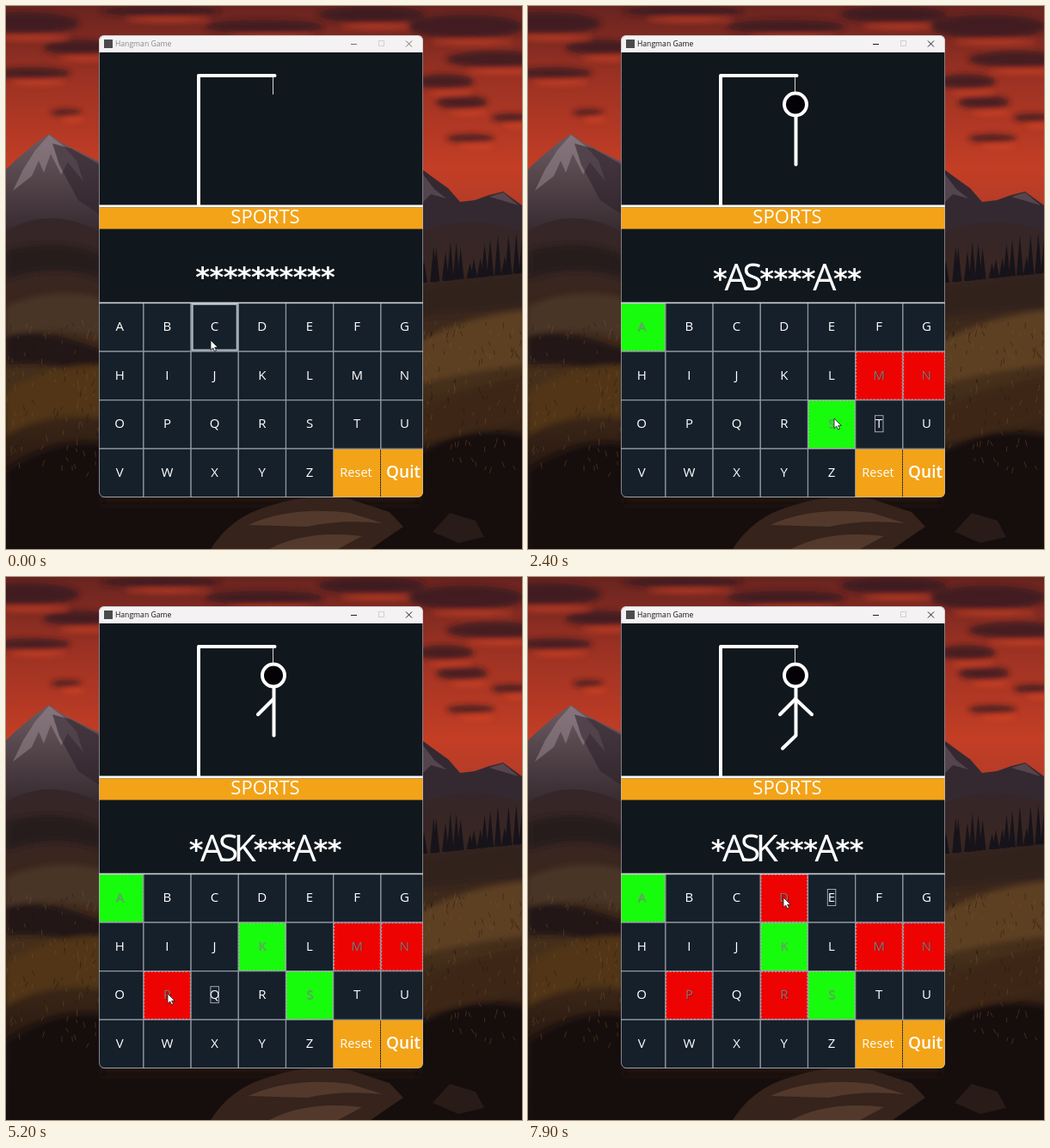
An HTML page for the animation above (8000 ms loop, 600 px wide and 632 px high).

```html
<!DOCTYPE html>
<html lang="en">
<head>
<meta charset="utf-8">
<title>Hangman Game</title>
<style>
html, body { margin: 0; width: 100%; height: 100%; overflow: hidden; background: #140e0d; }
svg { display: block; width: 600px; height: 632px; }
text { font-family: "Open Sans", "Noto Sans", sans-serif; font-stretch: 75%; fill: #fff; text-anchor: middle; }
#title { font-stretch: 100%; font-size: 8.6px; text-anchor: start; }
.star { font-family: "DejaVu Sans", sans-serif; font-stretch: 100%; font-size: 32px; }
.letter { font-size: 43px; }
.key { font-size: 15px; }
.man { fill: none; stroke: #fff; stroke-width: 4; stroke-linecap: round; }
</style>
</head>
<body>
<svg id="stage" viewBox="0 0 600 632">
  <defs>
    <linearGradient id="sky" x2="0" y2="1">
      <stop offset="0" stop-color="#682420"/>
      <stop offset=".3" stop-color="#9a3123"/>
      <stop offset=".7" stop-color="#c43e25"/>
      <stop offset="1" stop-color="#a63a2a"/>
    </linearGradient>
    <linearGradient id="land" x2="0" y2="1">
      <stop offset="0" stop-color="#35262a"/>
      <stop offset=".25" stop-color="#3a261d"/>
      <stop offset=".5" stop-color="#46301b"/>
      <stop offset=".72" stop-color="#2d1c13"/>
      <stop offset="1" stop-color="#140e0d"/>
    </linearGradient>
    <linearGradient id="rock" x2="0" y2="1">
      <stop offset="0" stop-color="#6d5b62"/>
      <stop offset="1" stop-color="#2e2328"/>
    </linearGradient>
    <filter id="soft" x="-30%" y="-60%" width="160%" height="220%"><feGaussianBlur stdDeviation="3"/></filter>
    <clipPath id="frame"><rect x="108" y="34" width="377" height="538" rx="6"/></clipPath>
  </defs>

  <rect width="600" height="270" fill="url(#sky)"/>
  <g id="clouds" filter="url(#soft)"></g>
  <path d="M0 190 L14 177 L34 160 L50 149 L66 160 L84 169 L108 181 V280 H0Z" fill="url(#rock)"/>
  <path d="M50 150 L34 168 L20 190 L8 215 L30 198 L38 180 L44 194 L52 172 L64 196 L72 182 L90 204 L82 180 L66 162Z" fill="#a5969b" opacity=".45"/>
  <path d="M54 160 L62 185 L84 226 L108 242 V184 L76 166Z" fill="#2c2028" opacity=".55"/>
  <path d="M485 191 L500 202 L514 212 L528 228 L545 226 L562 220 L578 216 L600 232 V300 H485Z" fill="#352931"/>
  <path d="M485 196 L498 213 L512 224 L494 219 L485 228Z" fill="#685760" opacity=".6"/>
  <path d="M562 222 L578 217 L596 232 L576 226Z" fill="#6f5960" opacity=".6"/>
  <path d="M0 262 Q50 232 108 262 V300 H485 V262 Q540 240 600 262 V632 H0Z" fill="url(#land)"/>
  <g filter="url(#soft)">
    <path d="M0 285 Q60 268 112 290 V318 Q60 298 0 318Z" fill="#251a1e"/>
    <path d="M0 350 Q50 326 112 340 V386 Q50 370 0 384Z" fill="#4a3427"/>
    <path d="M0 384 Q40 372 112 400 V432 Q50 412 0 418Z" fill="#231712"/>
    <path d="M0 450 Q50 415 112 418 V480 Q50 470 0 500Z" fill="#513419"/>
    <path d="M480 326 Q545 314 604 308 V350 L480 362Z" fill="#33231c"/>
    <path d="M480 390 Q540 360 604 354 V418 Q540 425 480 440Z" fill="#5d4020"/>
    <path d="M480 470 Q540 440 604 430 V480 L480 510Z" fill="#3d2816"/>
    <path d="M0 540 Q60 500 112 510 V580 H480 V520 Q540 485 604 500 V640 H0Z" fill="#17100f"/>
  </g>
  <g id="plants" fill="none"></g>
  <path d="M238 632 Q262 594 306 582 Q352 566 400 574 L446 589 L462 606 L424 632Z" fill="#35231c"/>
  <path d="M282 604 Q330 582 400 590 L438 602 Q390 597 350 606Z M306 632 Q350 609 414 617 L386 632Z" fill="#604332" opacity=".7"/>
  <path d="M496 612 L516 590 L546 599 L556 618 L526 625Z" fill="#291b17"/>

  <g clip-path="url(#frame)">
    <rect x="108" y="34" width="377" height="538" fill="#10171d"/>
    <rect x="108" y="34" width="377" height="20" fill="#f4f2f3"/>
    <rect x="114" y="39" width="10" height="10" fill="#4b4b4d"/>
    <text id="title" x="127" y="47">Hangman Game</text>
    <g id="controls" fill="none" stroke-width="1">
      <path d="M401 44.5h7M465 40.5l7 7m0-7l-7 7"/>
      <rect x="433.500" y="40.500" width="6" height="6" stroke="#d2d0d1"/>
    </g>
    <path class="man" d="M224 232V81H312.500" stroke-linejoin="round"/>
    <path d="M310.500 82V103" stroke="#d5d7d9"/>
    <g id="man">
      <circle class="man" cx="311" cy="114.500" r="13" style="fill:#050207"/>
      <path class="man" d="M311.500 129V184.500"/>
      <path class="man" d="M311 142L293 160"/>
      <path class="man" d="M311 142L330 160"/>
      <path class="man" d="M311 185L296 199.500"/>
    </g>
    <rect x="108" y="231.500" width="377" height="3" fill="#fff"/>
    <rect x="108" y="234.500" width="377" height="25" fill="#f3a318"/>
    <text x="301.500" y="252.500" font-size="22">SPORTS</text>
    <g id="word"></g>
    <g id="keys"></g>
    <rect x="381" y="516" width="54" height="56" fill="#f3a318"/>
    <rect x="436" y="516" width="50" height="56" fill="#f3a318"/>
    <path d="M435.500 516V572" stroke="#695334" stroke-dasharray="2 1"/>
    <text x="407" y="547.500" font-size="14.500">Reset</text>
    <text x="462" y="548.500" font-size="19" font-weight="600">Quit</text>
  </g>
  <rect x="108.500" y="34.500" width="376" height="537" rx="6" fill="none" stroke="#b9b9bd" stroke-opacity=".65"/>
  <path id="cursor" d="M0 0V11.500L2.700 9L4.600 13L6.500 12.100L4.700 8.300H8.300Z" fill="#fff" stroke="#161616" stroke-width=".8"/>
</svg>
<script>
const LOOP = 8000, STEP = 100, ANSWER = "BASKETBALL";
const SVG = "http://www.w3.org/2000/svg";
const get = id => document.getElementById(id);

function add(parent, tag, attrs, content = "") {
  const node = document.createElementNS(SVG, tag);
  for (const name in attrs) node.setAttribute(name, attrs[name]);
  node.textContent = content;
  return parent.appendChild(node);
}

let seed = 17;
const random = () => (seed = seed * 16807 % 2147483647) / 2147483647;

function paintScenery() {
  const clouds = [
    [20, 20, 65, 13], [85, 48, 42, 9], [30, 78, 45, 7], [70, 124, 18, 4],
    [180, 6, 70, 6], [300, 24, 70, 8], [425, 10, 62, 10], [535, 24, 68, 14],
    [570, 62, 58, 10], [510, 88, 34, 9], [530, 112, 30, 8], [540, 154, 28, 5], [588, 130, 24, 5]
  ];
  for (const [cx, cy, rx, ry] of clouds) {
    add(get("clouds"), "ellipse", { cx, cy, rx, ry, fill: "#351d20", opacity: .8 });
    add(get("clouds"), "ellipse", { cx: cx + 8, cy: cy + ry + 4, rx: rx * .7, ry: 3, fill: "#df4829", opacity: .6 });
  }
  for (let i = 0; i < 17; i++) {
    const x = 486 + i * 7 + random() * 5, h = 18 + random() * 30, y = 322 - i * .7;
    add(get("plants"), "path", { d: `M${x - 4} ${y}L${x} ${y - h}L${x + 4} ${y}Z`, fill: "#17131a" });
  }
  for (let i = 0; i < 260; i++) {
    const x = i % 2 ? 485 + random() * 115 : random() * 108, y = 370 + random() * 180;
    add(get("plants"), "path", {
      d: `M${x} ${y}l${random() * 6 - 3} ${-3 - random() * 5}`,
      stroke: random() < .5 ? "#7a5529" : "#1d130f", opacity: .45
    });
  }
}

// Press time of each guessed letter; releasing it reveals the outcome.
const guesses = [["A", 500], ["M", 1000], ["N", 1500], ["S", 2100], ["K", 3400], ["P", 5000], ["R", 7000], ["D", 7600]]
  .map(([letter, press]) => ({ letter, press, release: press + 100 }));

const route = [
  [0, 238, 389], [400, 137, 380], [600, 137, 380], [900, 408, 431], [1100, 408, 431],
  [1400, 455, 433], [1600, 455, 433], [2000, 356, 480], [2400, 356, 480], [3200, 296, 433],
  [3600, 296, 433], [4200, 349, 433], [4500, 349, 433], [4900, 188, 485], [5200, 188, 485],
  [5800, 273, 395], [6200, 278, 397], [6800, 291, 483], [7100, 291, 483], [7500, 297, 373], [8000, 297, 373]
];

function cursorAt(t) {
  const i = route.findIndex(point => point[0] > t);
  const [t0, x0, y0] = route[i - 1], [t1, x1, y1] = route[i];
  const p = (t - t0) / (t1 - t0), k = p * p * (3 - 2 * p);
  return [x0 + (x1 - x0) * k, y0 + (y1 - y0) * k];
}

const keys = [..."ABCDEFGHIJKLMNOPQRSTUVWXYZ"].map((letter, i) => {
  const x = 104.7 + i % 7 * 55.2, y = 345.5 + Math.floor(i / 7) * 56.6;
  const left = Math.max(x, 107.5), right = Math.min(x + 55.2, 485.5);
  const g = get("keys"), cx = x + 27.5, cy = y + 27;
  const inset = (n, attrs) => add(g, "rect", {
    x: left + n, y: y + n, width: right - left - 2 * n, height: 56.6 - 2 * n, ...attrs
  });
  return {
    letter, left, right, y,
    face: inset(0, { stroke: "#929aa2", "stroke-width": 1.2 }),
    dots: inset(.8, { fill: "none", stroke: "#c5b9b6", "stroke-width": .8, "stroke-dasharray": "2 2" }),
    hover: inset(1.5, { fill: "none", stroke: "#aab8c4", "stroke-width": 2.2 }),
    shade: add(g, "text", { class: "key", x: cx + .8, y: cy + 6.3 }, letter),
    label: add(g, "text", { class: "key", x: cx, y: cy + 5.5 }, letter),
    focus: add(g, "rect", { x: cx - 4.7, y: cy - 9, width: 9.5, height: 19, fill: "none", stroke: "#a9b6c2", "stroke-width": .9 })
  };
});
add(get("keys"), "path", { d: "M108 345.500H485", stroke: "#d0d3d6", "stroke-width": 1.3 });

const show = (node, on) => node.setAttribute("visibility", on ? "visible" : "hidden");

const glyphs = [...ANSWER].map(() => add(get("word"), "text", {}));
const ADVANCE = { "*": 16.2, A: 21, S: 17, K: 21 };

function drawWord(used) {
  const shown = [...ANSWER].map(c => used.includes(c) ? c : "*");
  const started = used.length > 0;
  let x = 301.5 - shown.reduce((sum, c) => sum + ADVANCE[c], 0) / 2;
  shown.forEach((c, i) => {
    const glyph = glyphs[i], star = c === "*";
    glyph.textContent = c;
    glyph.setAttribute("class", star ? "star" : "letter");
    glyph.setAttribute("font-weight", star ? 700 : 400);
    glyph.setAttribute("x", x + ADVANCE[c] / 2);
    glyph.setAttribute("y", !star ? 331 : started ? 328 : 326);
    x += ADVANCE[c];
  });
}

function drawKeys(used, pressed, focused, [cx, cy]) {
  for (const key of keys) {
    const { letter } = key, done = used.includes(letter), right = ANSWER.includes(letter);
    const down = letter === pressed;
    const over = cx >= key.left && cx < key.right && cy >= key.y && cy < key.y + 56.6;
    key.face.setAttribute("fill", done ? (right ? "#17fc0c" : "#ee0303") : down ? "#b8cfe5" : "#16202b");
    key.label.style.fill = done ? (right ? "#779779" : "#96706c") : "#fff";
    key.shade.style.fill = right ? "#35bf36" : "#751715";
    show(key.shade, done);
    show(key.dots, done);
    show(key.hover, over && !done && !down);
    show(key.focus, letter === focused && !done);
  }
}

function render(time) {
  const t = Math.floor(time % LOOP / STEP) * STEP;
  const used = guesses.filter(g => t >= g.release).map(g => g.letter);
  const pressed = guesses.find(g => t >= g.press && t < g.release)?.letter;
  const last = used[used.length - 1];
  const next = last && keys.slice(keys.findIndex(k => k.letter === last) + 1).find(k => !used.includes(k.letter)).letter;
  const misses = used.filter(c => !ANSWER.includes(c)).length;
  const active = t >= guesses[0].press;
  const cursor = cursorAt(t);

  get("title").style.fill = active ? "#161616" : "#8b898a";
  get("controls").setAttribute("stroke", active ? "#202020" : "#747273");
  [...get("man").children].forEach((part, i) => show(part, i < misses));
  drawWord(used);
  drawKeys(used, pressed, pressed || next, cursor);
  get("cursor").setAttribute("transform", `translate(${cursor})`);
}

paintScenery();
const start = performance.now();
function tick() {
  render(performance.now() - start);
  requestAnimationFrame(tick);
}
tick();
</script>
</body>
</html>
```
